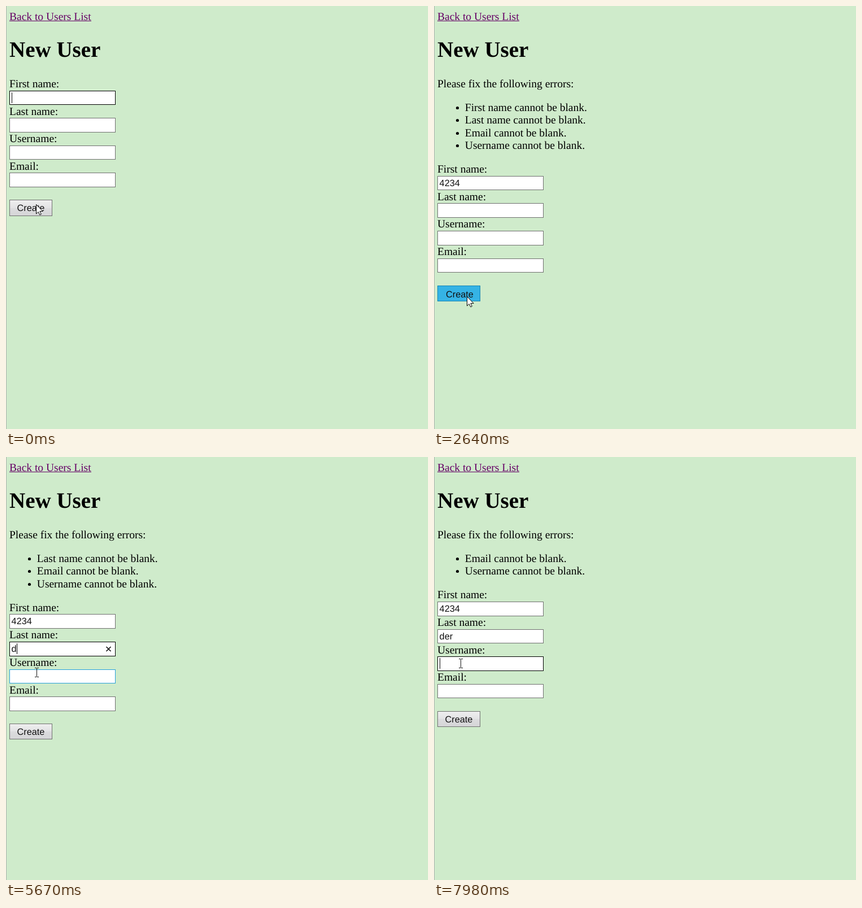
Recreate the animation shown at these times as an HTML page. Size 747 by 749 pixels, loop 8000 ms.

```html
<!DOCTYPE html>
<html lang="en">
<head>
<meta charset="utf-8">
<title>New User</title>
<style>
html, body { margin: 0; width: 100%; height: 100%; overflow: hidden; background: #cfebcb; }
svg { display: block; width: 747px; height: 749px; }
text { font: 19.5px "Liberation Serif", "Times New Roman", serif; text-rendering: geometricPrecision; }
.title { font-size: 39px; font-weight: bold; }
.link { fill: #606; }
.ui { font: 16.27px "Liberation Sans", Arial, sans-serif; fill: #111; }
.field { fill: #fff; stroke: #707070; }
.field.hover { stroke: #26a0da; }
.field.focus { stroke: #000; }
.button { fill: url(#face); stroke: #707070; }
.button.hover { fill: #a6f4ff; stroke: #26a0da; }
.button.press { fill: #35b3e5; stroke: #1585b5; }
.clear { stroke: #111; stroke-width: 1.7; }
.arrow { fill: #fff; stroke: #000; }
.beam { fill: none; stroke: #111; }
</style>
</head>
<body>
<svg viewBox="0 0 747 749">
  <defs>
    <linearGradient id="face" x2="0" y2="1">
      <stop offset="0" stop-color="#efefef"/>
      <stop offset=".5" stop-color="#e2e2e4"/>
      <stop offset=".5" stop-color="#dcdcde"/>
      <stop offset="1" stop-color="#d5d5d7"/>
    </linearGradient>
  </defs>
  <rect width="747" height="749" fill="#cfebcb"/>
  <rect width="1" height="749" fill="#adb3ad"/>
  <text class="link" x="6" y="24.5">Back to Users List</text>
  <rect x="6" y="26" width="145" height="1" fill="#606"/>
  <text class="title" x="6" y="90">New User</text>
  <g id="form"></g>
</svg>
<script>
const LOOP = 8000, LINE = 22.4, PITCH = 48.6;
const LABELS = ['First name:', 'Last name:', 'Username:', 'Email:'];
const ERRORS = ['First name', 'Last name', 'Email', 'Username'];

const steps = [];
let state = { t: 0, x: 53, y: 351, pointer: 'arrow', errors: 0, values: ['', ''],
              focus: 0, hover: -1, caret: true, button: '' };
const at = (t, change) => steps.push(state = { ...state, ...change, t });
const move = (t, x, y, change) => at(t, { x, y, ...change });

// empty form is sent
at(0, {});
at(130, { button: 'press', focus: -1 });
move(280, 50, 335, { button: '', errors: 4, pointer: 'beam' });
move(430, 45, 278, { hover: 0 });
move(550, 44, 283, { hover: -1 });
move(680, 45, 294);
move(820, 48, 306, { hover: 0 });
move(950, 49, 314);
at(1090, { hover: -1, focus: 0 });

// first name is typed and sent
at(1520, { values: ['4', ''] });
at(1660, { values: ['42', ''] });
move(1800, 68, 455, { values: ['423', ''], hover: 3 });
move(1940, 82, 519, { values: ['4234', ''], hover: -1, pointer: 'arrow', button: 'hover' });
move(2080, 72, 517);
move(2220, 64, 515);
move(2370, 58, 514);
at(2640, { button: 'press', focus: -1 });
at(2900, { button: '', errors: 3 });
move(3170, 54, 470);
move(3300, 52, 385, { pointer: 'beam', hover: 2 });
move(3450, 50, 315, { hover: -1 });
move(3570, 50, 292, { hover: 0 });

// last name is typed and sent
move(3720, 50, 300);
move(3860, 50, 315, { hover: -1 });
move(4000, 50, 330, { hover: 1 });
move(4130, 50, 340);
at(4270, { hover: -1, focus: 1 });
move(4580, 50, 325);
move(4720, 50, 305);
move(4850, 50, 292, { hover: 0, caret: false });
move(5120, 51, 318, { hover: -1 });
move(5250, 52, 340);
move(5390, 53, 355, { values: ['4234', 'd'], caret: true });
move(5520, 53, 366);
move(5670, 54, 381, { hover: 2 });
move(5790, 54, 390);
at(5920, { values: ['4234', 'de'] });
move(6060, 54, 405, { values: ['4234', 'der'], hover: -1 });
move(6330, 54, 432, { hover: 3 });
move(6600, 54, 441);
move(6720, 54, 457, { hover: -1 });
move(6860, 53, 466, { pointer: 'arrow' });
move(6990, 51, 479, { button: 'hover' });
at(7270, { button: 'press', focus: -1 });
at(7410, { button: '', errors: 2 });
move(7550, 49, 425, { pointer: 'beam' });
move(7680, 48, 388);
move(7830, 47, 365, { hover: 2 });
at(7980, { hover: -1, focus: 2 });

const text = (x, y, label, cls = '') =>
  `<text class="${cls}" x="${x}" y="${Math.round(y)}">${label}</text>`;

// rectangle with edges snapped to whole pixels and a 1px border inside
function box(cls, top, height, width) {
  const y = Math.round(top), h = Math.round(top + height) - y;
  return `<rect class="${cls}" x="6.5" y="${y + .5}" width="${width - 1}" height="${h - 1}"/>`;
}

function errorList(count) {
  if (!count) return '';
  return text(6, 144, 'Please fix the following errors:') +
    ERRORS.slice(-count).map((name, i) => {
      const y = Math.round(186 + i * LINE);
      return `<circle cx="41.5" cy="${y - 5.5}" r="2.6"/>` + text(54.8, y, name + ' cannot be blank.');
    }).join('');
}

function field(s, i, form) {
  const top = form + i * PITCH, y = Math.round(top);
  const value = s.values[i] || '', focus = s.focus === i;
  const look = focus ? 'focus' : s.hover === i ? 'hover' : '';
  let out = text(6, top - 5.6, LABELS[i]) + box('field ' + look, top, 25.6, 188);
  if (value) out += text(9.6, y + 18, value, 'ui');
  if (focus && s.caret) {
    const x = value ? Math.round(10 + value.length * 9.05) : 10;
    out += `<rect x="${x}" y="${y + 3}" width="1" height="19"/>`;
  }
  if (focus && value)
    out += `<path class="clear" d="M177.5 ${y + 9}l8 8m0-8l-8 8"/>`;
  return out;
}

function button(s, form) {
  const top = form + 193.8, shift = s.button === 'press' ? 1.4 : 0;
  return box('button ' + s.button, top, 28.2, 76) +
    text(19.6 + shift, Math.round(top) + 20 + shift, 'Create', 'ui');
}

function pointer(s) {
  const d = s.pointer === 'arrow'
    ? 'M0 0V16.5L3.7 13L6.3 18.4L8.8 17.3L6.4 12H11.6Z'
    : 'M-3.5-8h3m1 0h3M0-7.5V7.5M-3.5 8h3m1 0h3';
  return `<path class="${s.pointer}" transform="translate(${s.x + .5} ${s.y + .5})" d="${d}"/>`;
}

const group = document.getElementById('form');
let shown;

function draw(s) {
  const form = s.errors ? 211.2 + s.errors * LINE : 149.6;
  group.innerHTML = errorList(s.errors) +
    LABELS.map((_, i) => field(s, i, form)).join('') + button(s, form) + pointer(s);
}

function tick() {
  const t = performance.now() % LOOP;
  const s = steps.findLast(step => step.t <= t);
  if (s !== shown) draw(shown = s);
  requestAnimationFrame(tick);
}
tick();
</script>
</body>
</html>
```
